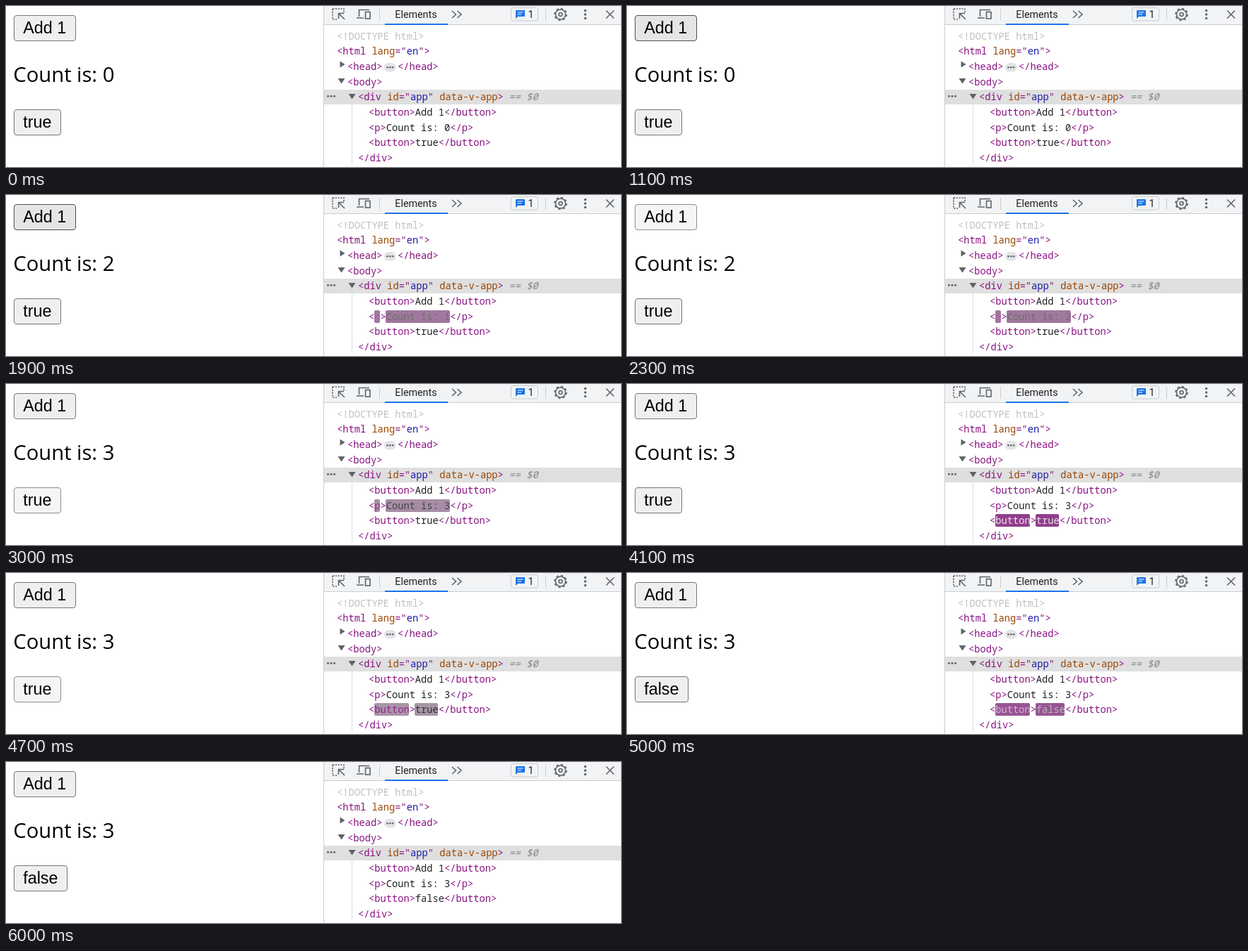
Animation of 870 by 229 pixels, one loop 6.4 s. Source, as an HTML page:

```html
<!DOCTYPE html>
<html lang="en">
<head>
<meta charset="utf-8">
<title>Count demo</title>
<style>
html, body { margin: 0; width: 100%; height: 100%; overflow: hidden; background: #fff; }
svg { display: block; width: 870px; height: 229px; }
text { white-space: pre; }
.btn { font: 23.33px "Liberation Sans", Arial, sans-serif; }
.count { font: 29.2px "Open Sans", "Noto Sans", sans-serif; }
.ui { font: 14.3px Roboto, sans-serif; fill: #202124; }
.code { font: 13.72px "Noto Sans Mono", monospace; fill: #202124; }
.tag { fill: #881280; }
.attr { fill: #994500; }
.val { fill: #1a1aa6; }
.icon { fill: none; stroke: #5f6368; stroke-width: 1.6; }
.solid { fill: #5f6368; }
</style>
</head>
<body>
<svg viewBox="0 0 870 229">
  <g class="btn">
    <rect id="addBox" x="11.5" y="13.5" width="87" height="36" rx="3.5"/>
    <text x="24.2" y="39">Add 1</text>
    <rect id="flagBox" x="11.5" y="147.5" height="36" rx="3.5"/>
    <text id="flagText" x="24.2" y="173"></text>
  </g>
  <text id="countText" class="count" x="10.3" y="108"></text>

  <rect x="450" width="420" height="26" fill="#f1f3f4"/>
  <path d="M449.5 0V229M450 26.5H870M528.5 4V21M763.5 4V21" stroke="#cacdd1"/>
  <rect x="536" y="25" width="89" height="2" fill="#1a73e8"/>
  <text class="ui" x="550.3" y="17">Elements</text>
  <g class="icon">
    <path d="M462 4H478V10M462 4V19H468" stroke-dasharray="2.2 1.6"/>
    <path d="M471 11L479 19M470.5 18V10.5H478"/>
    <path d="M499.5 15V5.5H514M496 17H506"/>
    <rect x="508.5" y="8.5" width="6.5" height="9.5"/>
    <path d="M631 7L636.5 12L631 17M638.5 7L644 12L638.5 17"/>
    <circle cx="784.5" cy="12" r="7"/>
    <circle cx="784.5" cy="12" r="8.5" stroke-dasharray="3.34 3.34"/>
    <circle cx="784.5" cy="12" r="2.5"/>
    <path d="M849 6.5L860 17.5M860 6.5L849 17.5"/>
  </g>
  <g class="solid">
    <circle cx="819.5" cy="6.5" r="1.7"/>
    <circle cx="819.5" cy="12" r="1.7"/>
    <circle cx="819.5" cy="17.5" r="1.7"/>
  </g>
  <rect x="714.5" y="2.5" width="38" height="18.5" rx="2.5" fill="#f1f3f4" stroke="#cacdd1"/>
  <path d="M722 6H733Q734 6 734 7V14Q734 15 733 15H724L721 18V7Q721 6 722 6Z" fill="#1a73e8"/>
  <path d="M723.5 9H731.5M723.5 12H729" stroke="#fff" stroke-width="1.2"/>
  <text class="ui" x="738.5" y="17">1</text>

  <rect x="450" y="119" width="420" height="21" fill="#dfdfdf"/>
  <path d="M489.5 140V226" stroke="#d3e3e6"/>
  <g class="solid">
    <path d="M472.5 78.5L479.5 83L472.5 87.5ZM469.5 103H479.5L474.5 110.5ZM484.5 125H494.5L489.5 132.5Z"/>
    <circle cx="455.5" cy="128.3" r="1.5"/>
    <circle cx="460" cy="128.3" r="1.5"/>
    <circle cx="464.5" cy="128.3" r="1.5"/>
  </g>
  <rect x="535" y="81" width="16.5" height="12.5" rx="6" fill="#e2e4e7"/>
  <g class="solid">
    <circle cx="539.5" cy="87.3" r="1.3"/>
    <circle cx="543.3" cy="87.3" r="1.3"/>
    <circle cx="547.1" cy="87.3" r="1.3"/>
  </g>
  <g id="marks"></g>
  <g id="tree" class="code"></g>
</svg>
<script>
const LOOP = 6400, STEP = 100, CHAR = 8.23;
const $ = id => document.getElementById(id);
const NS = 'http://www.w3.org/2000/svg';

function add(parent, name, attrs, text = '') {
  const el = document.createElementNS(NS, name);
  for (const k in attrs) el.setAttribute(k, attrs[k]);
  el.textContent = text;
  return parent.appendChild(el);
}

// Each part is [class, text]; returns the tspans.
function line(row, x, ...parts) {
  const t = add($('tree'), 'text', { x, y: 47.7 + 21.67 * row });
  return parts.map(([cls, s]) => add(t, 'tspan', { class: cls }, s));
}
const tag = s => ['tag', s];

line(0, 468, ['doc', '<!DOCTYPE html>'])[0].style.fill = '#c0c0c0';
line(1, 468, tag('<html '), ['attr', 'lang'], tag('="'), ['val', 'en'], tag('">'));
line(2, 483, tag('<head>'));
line(2, 554, tag('</head>'));
line(3, 483, tag('<body>'));
line(4, 498, tag('<div '), ['attr', 'id'], tag('="'), ['val', 'app'], tag('" '), ['attr', 'data-v-app'], tag('>'));
const ref = line(4, 711.5, ['ref', '== $0'])[0];
ref.style.cssText = 'fill:#80868b;font-style:italic';
line(5, 513, tag('<button>'), ['', 'Add 1'], tag('</button>'));
const pRow = watched(6, 'p');
const bRow = watched(7, 'button');
line(8, 498, tag('</div>'));

function watched(row, name) {
  const [, label, , body] = line(row, 513, tag('<'), tag(name), tag('>'), ['', ''], tag(`</${name}>`));
  const y = Math.round(33.6 + 21.67 * row);
  const box = (col, len) => add($('marks'), 'rect',
    { x: Math.floor(513 + col * CHAR), y, width: Math.round(len * CHAR), height: 18, rx: 2 });
  return { label, body, marks: [box(1, name.length), box(name.length + 2, 0)] };
}

// [time, value]; the last entry reached wins.
const count = [[0, 0], [1500, 1], [1900, 2], [2400, 3]];
const countDom = [[0, 0], [1600, 1], [2000, 2], [2500, 3]];
const flag = [[0, 'true'], [3100, 'false'], [3900, 'true'], [4800, 'false']];
const flagDom = [[0, 'true'], [3200, 'false'], [4070, 'true'], [4890, 'false']];
const addState = [[0, 'idle'], [1100, 'hover'], [1400, 'down'], [1500, 'hover'], [1800, 'down'],
  [1900, 'hover'], [2300, 'down'], [2400, 'hover'], [2700, 'idle']];
const flagState = [[0, 'idle'], [2800, 'hover'], [3000, 'down'], [3100, 'idle'], [3800, 'down'],
  [3900, 'idle'], [4500, 'hover'], [4700, 'down'], [4800, 'idle']];
const look = { idle: ['#efefef', '#767676'], hover: ['#e5e5e5', '#4f4f4f'], down: ['#f5f5f5', '#8d8d8d'] };

const at = (table, t) => table.filter(e => e[0] <= t).pop();
const mix = (a, b, k) => `rgb(${a.map((v, i) => Math.round(v + (b[i] - v) * k))})`;

// cubic-bezier(0, 0, .2, 1)
function ease(x) {
  let lo = 0, hi = 1;
  for (let i = 0; i < 20; i++) {
    const m = (lo + hi) / 2;
    if (.6 * m * m + .4 * m ** 3 < x) lo = m; else hi = m;
  }
  return 3 * lo * lo - 2 * lo ** 3;
}

const HOLD = 980, OUT = 120;
const WHITE = [255, 255, 255], INK = [32, 33, 36], PURPLE = [136, 18, 128];

function paintRow(row, [start, value], text, t) {
  const age = start ? t - start : HOLD + OUT;
  const k = ease(Math.min(1, age / HOLD));
  const fade = 1 - ease(Math.min(1, Math.max(0, (age - HOLD) / OUT)));
  row.body.textContent = text + value;
  row.body.style.fill = mix(WHITE, INK, k);
  row.label.style.fill = mix(WHITE, PURPLE, k);
  row.marks[1].setAttribute('width', Math.round(row.body.textContent.length * CHAR));
  for (const m of row.marks) {
    m.style.fill = mix([142, 50, 136], [170, 157, 170], k);
    m.style.opacity = fade < .01 ? 0 : fade;
  }
}

function paintButton(box, state) {
  [box.style.fill, box.style.stroke] = look[state];
}

function draw(now) {
  const t = Math.floor((now % LOOP) / STEP) * STEP;
  const label = at(flag, t)[1];
  $('countText').textContent = 'Count is: ' + at(count, t)[1];
  $('flagText').textContent = label;
  $('flagBox').setAttribute('width', label === 'true' ? 66 : 75);
  paintButton($('addBox'), at(addState, t)[1]);
  paintButton($('flagBox'), at(flagState, t)[1]);
  paintRow(pRow, at(countDom, t), 'Count is: ', t);
  paintRow(bRow, at(flagDom, t), '', t);
}

const begin = performance.now();
function tick() {
  draw(performance.now() - begin);
  requestAnimationFrame(tick);
}
tick();
</script>
</body>
</html>
```
